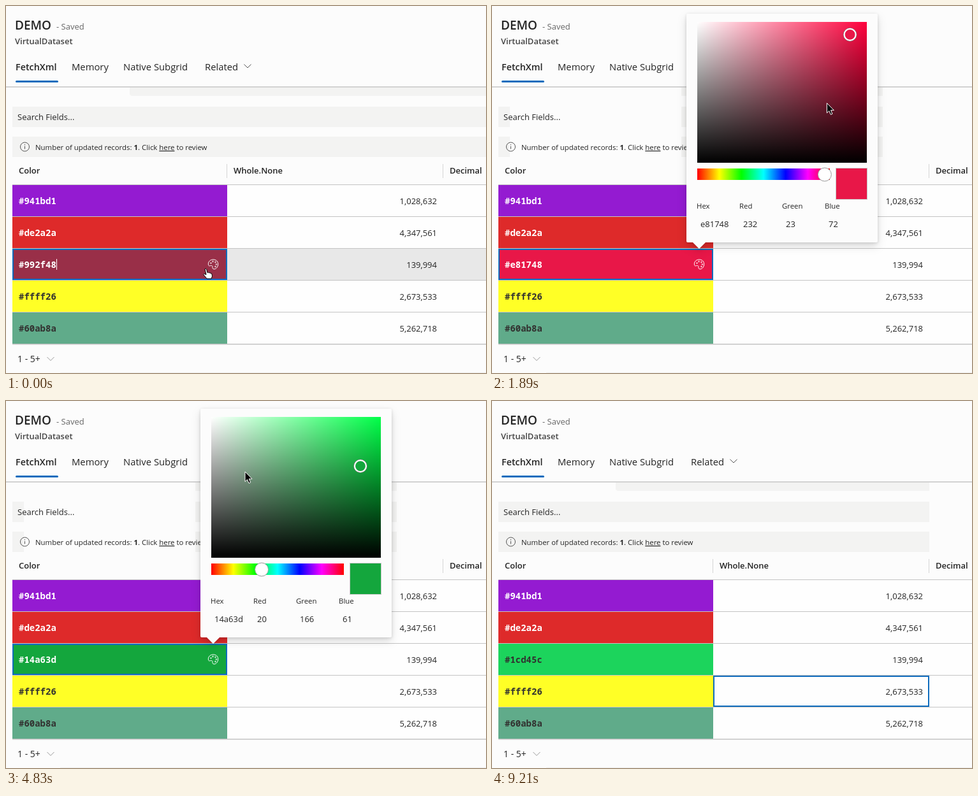
An HTML page that plays this animation: 753x576 px, repeating every 9.68 s.

```html
<!DOCTYPE html>
<html lang="en">
<head>
<meta charset="utf-8">
<title>Color column demo</title>
<style>
  html, body { margin: 0; width: 100%; height: 100%; overflow: hidden; background: #fcfcfc; }
  svg { display: block; }
  text { font: 13px "Open Sans", "Noto Sans", sans-serif; fill: #242424; white-space: pre; }
  .title { font-size: 19px; font-weight: 600; }
  .bold { font-weight: 600; }
  .tab { font-size: 14.8px; }
  .tab.bold { font-size: 14.4px; }
  .small { font-size: 11.4px; }
  .code { font: 600 14px "Noto Sans Mono", "DejaVu Sans Mono", monospace; }
  .line { fill: none; stroke: #c4c4c4; }
  .focus { fill: none; stroke: #0f6cbd; stroke-width: 2; }
  #popup { filter: drop-shadow(0 6px 7px #0002) drop-shadow(0 1px 2px #0002); }
</style>
</head>
<body>
<svg width="753" height="576" viewBox="0 0 753 576">
  <defs>
    <linearGradient id="white"><stop stop-color="#fff"/><stop offset="1" stop-color="#fff" stop-opacity="0"/></linearGradient>
    <linearGradient id="black" x2="0" y2="1"><stop stop-opacity="0"/><stop offset="1"/></linearGradient>
    <linearGradient id="rainbow"></linearGradient>
  </defs>

  <!-- Form header and bars -->
  <g fill="#f3f3f2">
    <path d="M194 127H753V141H198Q194 141 194 137Z"/>
    <path d="M10 158H753V190H10ZM10 205H753V237H10Z"/>
  </g>
  <rect id="trimRight" y="128" height="110" fill="#fcfcfc"/>
  <rect id="trimLeft" x="28" y="128" width="269" height="110" fill="#fcfcfc"/>
  <rect y="126" width="753" height="2" fill="#d2d2d2"/>
  <text class="title" x="14" y="37">DEMO</text>
  <text x="79" y="37" style="fill:#666">- Saved</text>
  <text class="bold" x="14" y="60" style="fill:#444">VirtualDataset</text>
  <text class="tab bold" x="15" y="101">FetchXml</text>
  <text class="tab" x="103" y="101">Memory</text>
  <text class="tab" x="184" y="101">Native Subgrid</text>
  <text class="tab" x="312" y="101">Related</text>
  <path d="M373.5 91.5l5.5 5.5 5.5-5.5" fill="none" stroke="#555"/>
  <rect x="15" y="117" width="67" height="3" rx="1.5" fill="#0f6cbd"/>
  <text x="18" y="179">Search Fields...</text>
  <circle cx="29.5" cy="221" r="7" fill="none" stroke="#555"/>
  <path d="M29.5 220v4.5M29.5 217v1.5" stroke="#555"/>
  <text class="small" x="46" y="226">Number of updated records: <tspan font-weight="700">1</tspan>. Click <tspan text-decoration="underline">here</tspan> to review</text>

  <!-- Table -->
  <text class="bold" x="20" y="263">Color</text>
  <text class="bold" x="357" y="263">Whole.None</text>
  <text class="bold" x="696" y="263">Decimal</text>
  <path d="M346.5 248v22M685.5 248v22" stroke="#d6d6d6"/>
  <rect x="10" y="281" width="743" height="250" fill="#fefefe"/>
  <rect id="hover" x="347" width="406" height="49" fill="#e8e8e8"/>
  <g id="rows"></g>
  <path class="line" d="M10 280.5H753M10 330.5H753M10 380.5H753M10 430.5H753M10 480.5H753"/>
  <path class="line" d="M10 530.8H753" stroke-width="1.6"/>
  <path id="caret" d="M79.5 397v17" stroke="#fff"/>
  <g id="palette" fill="none">
    <path d="M317.5 406.5C316.5 401 321 397.5 326 398C331 398.5 333.5 402.5 332.5 407C331.5 411.5 327.5 414 325 412.5C322.5 411 325.5 408 322.5 407.5C320.5 407.2 318.2 409 317.5 406.5Z"/>
    <circle cx="321.500" cy="403.5" r=".8"/><circle cx="324.5" cy="401" r=".8"/>
    <circle cx="328.5" cy="402" r=".8"/><circle cx="330" cy="405.5" r=".8"/><circle cx="328.5" cy="409" r=".8"/>
  </g>
  <rect id="focus" class="focus" height="47"/>
  <text x="18" y="559" style="font-size:14px">1 - 5+</text>
  <path d="M64.5 551l5.5 5.5 5.5-5.5" fill="none" stroke="#999"/>
  <path d="M85 575.5H753" stroke="#f0f0f0"/>

  <!-- Color picker -->
  <g id="popup">
    <path d="M305 14Q305 12 307 12H603Q605 12 605 14V369Q605 371 603 371H335L325 381 315 371H307Q305 371 305 369Z" fill="#fcfcfc"/>
    <g id="field"></g>
    <g id="ring">
      <circle r="10.3" fill="none" stroke="#777"/><circle r="9" stroke="#fff" stroke-width="2.2"/>
    </g>
    <rect x="322" y="255" width="208" height="18" fill="url(#rainbow)"/>
    <circle id="thumb" cy="264.5" r="10.5" fill="#fff" stroke="#999"/>
    <rect id="swatch" x="539.5" y="254.5" width="49" height="49" stroke="#c8c8c8"/>
    <rect id="hexBox" x="321" y="325" width="63" height="32" fill="#f3f3f2"/>
    <g id="inputs"></g>
  </g>

  <path id="arrow" d="M0 0V15.5L3.5 12.2 6 18 8.6 16.9 6.2 11.2H11Z" stroke="#fff"/>
  <path id="hand" d="M-1 1Q0-1 1.5 1L3 6.5Q4.5 5 5.5 7Q7 6 8 7.5Q9.5 7 10 9L10.5 12Q10 14 9 16H2Q0 13-3.5 9.5Q-3 7.5 1 9.5Z" fill="#fff" stroke="#000"/>
</svg>

<script>
const $ = id => document.getElementById(id);
const LOOP = 9680, OPEN = 150, CLOSE = 8800;
const AREA = { x: 322, y: 25, width: 266, height: 221 };
const SLIDER = { x: 322, width: 208 };

function set(el, attrs) {
  for (const key in attrs) el.setAttribute(key, attrs[key]);
}
function add(parent, tag, attrs, text = "") {
  const el = document.createElementNS("http://www.w3.org/2000/svg", tag);
  set(el, attrs);
  el.textContent = text;
  return parent.appendChild(el);
}
function show(id, on) {
  $(id).style.display = on ? "" : "none";
}

const parseHex = hex => hex.match(/../g).map(c => parseInt(c, 16));
const toHex = rgb => rgb.map(c => c.toString(16).padStart(2, "0")).join("");
const inkFor = ([r, g, b]) => r * .299 + g * .587 + b * .114 > 128 ? "#323130" : "#fff";

function toHsv(hex) {
  const [r, g, b] = parseHex(hex);
  const max = Math.max(r, g, b), d = max - Math.min(r, g, b);
  const h = max === r ? (g - b) / d + 6 : max === g ? (b - r) / d + 2 : (r - g) / d + 4;
  return [h % 6 * 60, d / max, max / 255];
}
function toRgb([h, s, v]) {
  return [5, 3, 1].map(n => {
    const k = (n + h / 60) % 6;
    return Math.round(255 * v * (1 - s * Math.max(0, Math.min(k, 4 - k, 1))));
  });
}

// Places of a colour in the picker
const spot = ([, s, v]) => [AREA.x + AREA.width * s, AREA.y + AREA.height * (1 - v)];
const slot = ([h]) => [SLIDER.x + SLIDER.width * h / 360, 264];
const withHue = ([h], [, s, v]) => [h, s, v];

const [wine, red, green, dark, mint] =
  ["992f48", "e81748", "14a63d", "0e1f14", "1cd45c"].map(toHsv);

// Steps: [from, to, goal]; equal times make a hard change
const picks = [
  [1080, 1600, red],
  [3440, 3440, withHue(green, red)],
  [4200, 4430, green],
  [5220, 5220, withHue(mint, green)],
  [5700, 6060, dark],
  [6620, 6620, mint]
];
const moves = [
  [90, 330, [318, 406]],
  [330, 1020, [502, 112]],
  [1080, 1600, spot(red)],
  [1680, 2000, [512, 192]],
  [2060, 2920, [380, 274]],
  [3040, 3270, slot(green)],
  [3500, 4020, spot(red)],
  [4200, 4430, spot(green)],
  [4500, 4830, [375, 111]],
  [4830, 5160, slot(mint)],
  [5260, 5520, spot(green)],
  [5700, 6060, spot(dark)],
  [6120, 6440, spot(mint)],
  [6920, 7560, [484, 268]],
  [7740, 8210, [510, 279]],
  [8210, 8560, [600, 461]],
  [CLOSE, 9210, [655, 580]]
];

function ease(t, from, to) {
  const u = Math.max(0, Math.min(1, (t - from) / (to - from || 1)));
  return u * u * (3 - 2 * u);
}
function follow(t, start, steps) {
  return steps.reduce((now, [from, to, goal]) => {
    const e = ease(t, from, to);
    return now.map((v, i) => v + (goal[i] - v) * e);
  }, start);
}

for (let i = 0; i <= 6; i++)
  add($("rainbow"), "stop", { offset: i / 6, "stop-color": `hsl(${i * 60} 100% 50%)` });

const [pure] = ["#f00", "url(#white)", "url(#black)"].map(fill =>
  add($("field"), "rect", { ...AREA, fill }));

const rows = [
  ["941bd1", "1,028,632"], ["de2a2a", "4,347,561"], ["992f48", "139,994"],
  ["ffff26", "2,673,533"], ["60ab8a", "5,262,718"]
].map(([hex, number], i) => {
  const y = 281 + i * 50;
  const cell = add($("rows"), "rect", { x: 10, y, width: 337, height: 49 });
  const label = add($("rows"), "text", { class: "code", x: 20, y: y + 29.5 });
  add($("rows"), "text", { x: 676, y: y + 30, "text-anchor": "end" }, number);
  const paint = rgb => {
    const code = "#" + toHex(rgb);
    cell.style.fill = code;
    label.style.fill = inkFor(rgb);
    label.textContent = code;
  };
  paint(parseHex(hex));
  return paint;
});

const inputs = ["Hex", "Red", "Green", "Blue"].map((name, i) => {
  const x = 321 + i * 67;
  add($("inputs"), "text", { class: "small", x, y: 318 }, name);
  return add($("inputs"), "text", { x: x + 6, y: 347 });
});

function draw(t) {
  const open = t >= OPEN && t < CLOSE;
  const closed = t >= CLOSE;
  const [x, y] = follow(t, [313, 412], moves);
  const color = follow(t, wine, picks);
  const rgb = toRgb(color), hex = toHex(rgb);

  rows[2](rgb);
  $("palette").style.stroke = inkFor(rgb);
  show("palette", !closed);
  show("caret", t < 90);

  const overYellow = t > 8210 && y > 431 && y < 480;
  show("hover", t < 90 || overYellow);
  set($("hover"), { y: overYellow ? 431 : 381 });
  set($("focus"), closed ? { x: 348, y: 432, width: 337 } : { x: 11, y: 382, width: 335 });

  const right = open ? 613 : closed ? 686 : 753;
  set($("trimRight"), { x: right, width: 753 - right });
  show("trimLeft", open && t >= 1080);
  show("hexBox", t < 1080);

  const alpha = ease(t, OPEN, 300) - ease(t, CLOSE, 8920);
  show("popup", alpha > 0);
  $("popup").style.opacity = alpha;
  set(pure, { fill: `hsl(${color[0]} 100% 50%)` });
  set($("ring"), { transform: `translate(${spot(color)})`, fill: "#" + hex });
  set($("thumb"), { cx: slot(color)[0] });
  set($("swatch"), { fill: "#" + hex });
  [hex, ...rgb].forEach((value, i) => inputs[i].textContent = value);

  show("hand", t < 330);
  show("arrow", t >= 330 && t < 9210);
  for (const id of ["hand", "arrow"]) set($(id), { transform: `translate(${x} ${y})` });
}

const start = performance.now();
function frame() {
  draw((performance.now() - start) % LOOP);
  requestAnimationFrame(frame);
}
frame();
</script>
</body>
</html>
```
